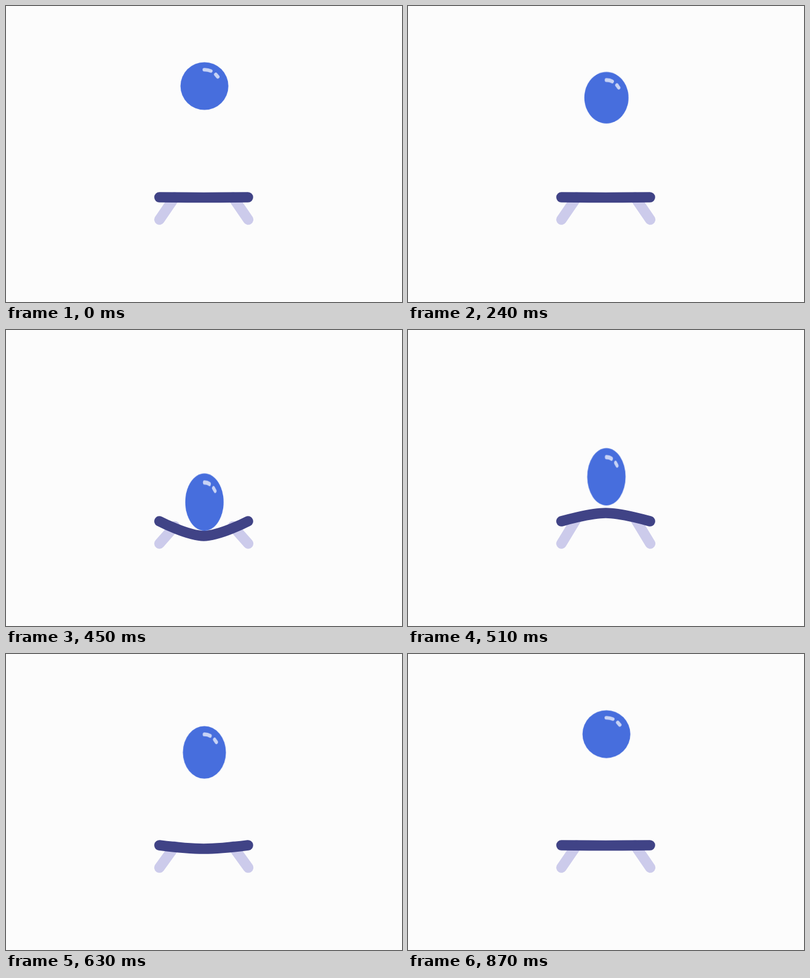
An HTML page without scripts that plays this animation: 671x503 px, repeating every 0.9 s.

```html
<!DOCTYPE html>
<html lang="en">
<head>
<meta charset="utf-8">
<title>Bouncing ball</title>
<style>
  html, body { margin: 0; width: 100%; height: 100%; overflow: hidden; background: #fcfcfc; }
  svg { display: block; width: 100%; height: 100%; }

  .drop, .stretch, .mat, .legs { animation: 900ms linear infinite; }
  .line { fill: none; stroke-linecap: round; stroke-linejoin: round; }

  /* The ball is moved and stretched from its lowest point. */
  .drop { animation-name: drop; }
  .stretch { animation-name: stretch; transform-origin: 336.2px 176.5px; }
  .ball { fill: #476edd; }
  .shine { stroke: #c8d3f5; stroke-width: 6; }

  .mat { animation-name: mat; stroke: #404386; stroke-width: 17.6; }
  .legs { animation-name: legs; stroke: #cccbeb; stroke-width: 17.6; }

  @keyframes drop {
    0% { transform: translateY(0); animation-timing-function: cubic-bezier(.78, 0, .79, .55); }
    51.11% { transform: translateY(172px); animation-timing-function: cubic-bezier(.21, .45, .22, 1); }
    100% { transform: translateY(0); }
  }

  @keyframes stretch {
    0% { transform: scale(1, 1); animation-timing-function: cubic-bezier(.5, 0, .75, .45); }
    40%, 60% { transform: scale(.8, 1.2); animation-timing-function: cubic-bezier(.25, .55, .5, 1); }
    100% { transform: scale(1, 1); }
  }

  /* Pressed down by the ball, then a damped wobble. */
  @keyframes mat {
    0%, 46.67% { d: path("M260 325C260 325 308 325.5 335 325.5C362 325.5 410 325 410 325"); }
    51.11% { d: path("M260 325C260 325 308 357 335 357C362 357 410 325 410 325"); }
    56.67% { d: path("M260 325C260 325 308 311 335 311C362 311 410 325 410 325"); animation-timing-function: ease-in-out; }
    70% { d: path("M260 325C260 325 308 331 335 331C362 331 410 325 410 325"); animation-timing-function: ease-in-out; }
    83.33% { d: path("M260 325C260 325 308 322 335 322C362 322 410 325 410 325"); animation-timing-function: ease-in-out; }
    96.67%, 100% { d: path("M260 325C260 325 308 325.5 335 325.5C362 325.5 410 325 410 325"); }
  }

  @keyframes legs {
    0%, 46.67% { d: path("M260 363L286 325M410.4 363L384.4 325"); }
    51.11% { d: path("M260 363L286 336M410.4 363L384.4 336"); }
    56.67% { d: path("M260 363L286 320M410.4 363L384.4 320"); animation-timing-function: ease-in-out; }
    70% { d: path("M260 363L286 327M410.4 363L384.4 327"); animation-timing-function: ease-in-out; }
    83.33% { d: path("M260 363L286 324M410.4 363L384.4 324"); animation-timing-function: ease-in-out; }
    96.67%, 100% { d: path("M260 363L286 325M410.4 363L384.4 325"); }
  }
</style>
</head>
<body>
<svg viewBox="0 0 671 503" preserveAspectRatio="none">
  <path class="line legs" d="M260 363L286 325M410.4 363L384.4 325"/>
  <path class="line mat" d="M260 325C260 325 308 325.5 335 325.5C362 325.5 410 325 410 325"/>
  <g class="drop">
    <g class="stretch">
      <circle class="ball" cx="336.2" cy="136" r="40.6"/>
      <path class="line shine" d="M336 108.2Q342 108 347 110.4M355.4 116.2L358.8 120.2"/>
    </g>
  </g>
</svg>
</body>
</html>
```
